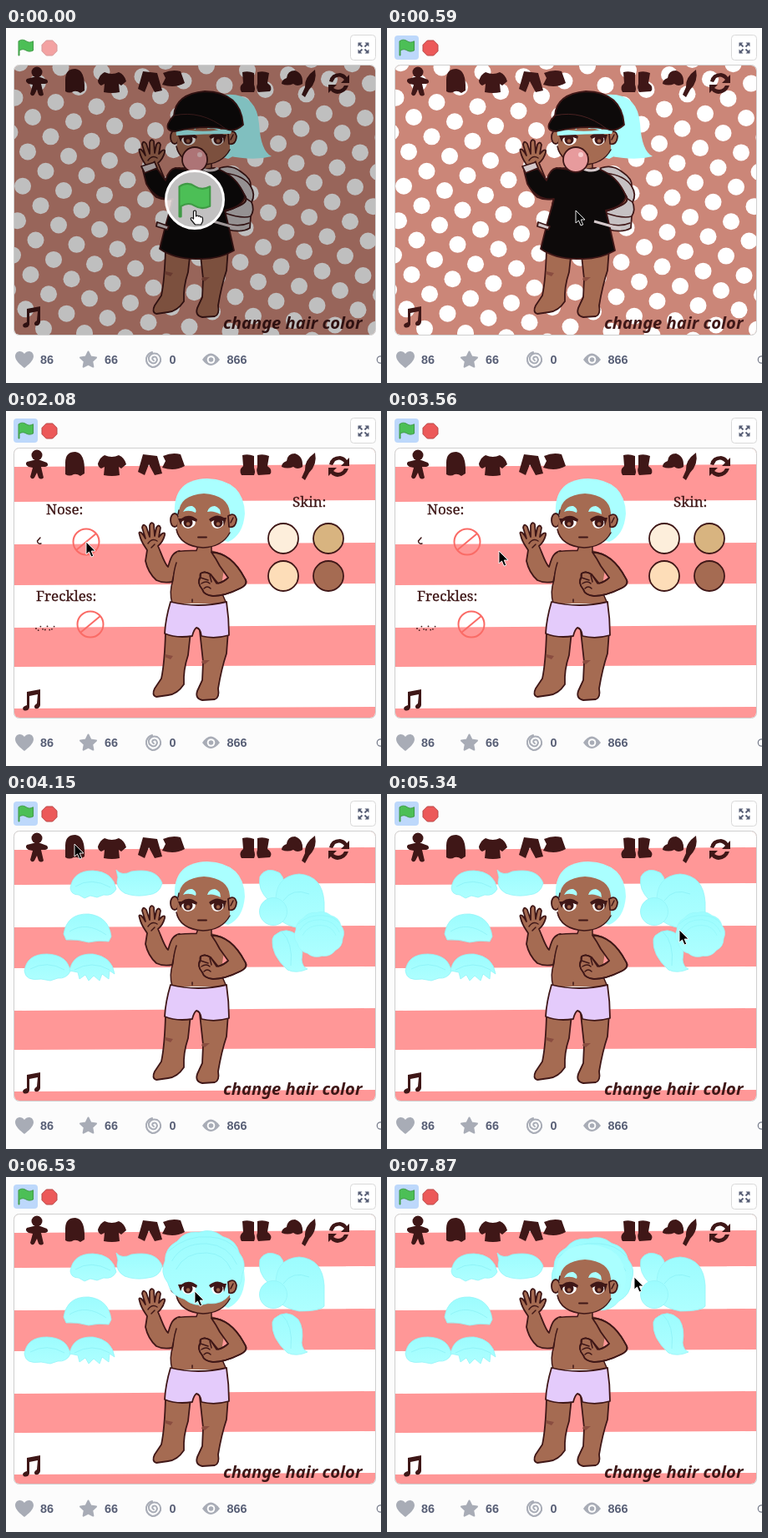
Animation, 449 px wide and 426 px high, one loop 8 s. Source, as an HTML page:

```html
<!DOCTYPE html>
<html lang="en">
<head>
<meta charset="utf-8">
<title>Dress-up player</title>
<style>
html, body { margin: 0; width: 100%; height: 100%; overflow: hidden; background: #fcfcfc; }
svg { display: block; width: 449px; height: 426px; }
.ink { fill: #3f1717; }
.line { stroke: #3f1717; stroke-width: 1.8; stroke-linejoin: round; stroke-linecap: round; }
.thin { fill: none; stroke: #3f1717; stroke-width: 1.5; stroke-linecap: round; }
.skin { fill: #a56b52; }
.black { fill: #0d0a0a; }
.hair { fill: url(#cyan); stroke: #93f4f8; stroke-width: .8; }
.cap { fill: #aaffff; }
.strand { fill: none; stroke: #84eef4; stroke-width: .9; opacity: .7; }
.label { font: 17px "Noto Serif", serif; fill: #3f1717; stroke: #3f1717; stroke-width: .3; }
.brush { font: italic bold 20.2px "Noto Sans", sans-serif; fill: #3f1717; }
.stat { font: bold 14.4px "Liberation Sans", Arial, sans-serif; fill: #575e75; }
.no { fill: none; stroke: #fa6b66; stroke-width: 2; }
.grey { fill: #a8acb6; }
</style>
</head>
<body>
<svg viewBox="0 0 449 426">
  <defs>
    <clipPath id="frame"><rect x="10" y="45" width="432" height="323" rx="6"/></clipPath>
    <linearGradient id="cyan" x1="0" y1="0" x2="0" y2="1">
      <stop offset="0" stop-color="#9cfcfe"/><stop offset="1" stop-color="#aeffff"/>
    </linearGradient>
    <g id="curly">
      <path id="blob" class="hair"/>
      <path class="strand" d="M-38 -8Q-26 -30 4 -29Q30 -27 40 -4M-33 2Q-22 -19 4 -18Q25 -17 33 2M-42 -20Q-20 -40 8 -37Q28 -36 40 -22"/>
    </g>
    <g id="no"><circle class="no" r="15.5"/><path class="no" d="M-12 10L12 -10"/></g>
    <path id="flag" d="M0 1.4C3 -.8 6 -.8 9 1.2S14.500 3 17.500 1.300V12.500C14.500 14 11.500 14 8.800 12.300S3.500 11 1 12.600V18.500H0Z" fill="#4cbf56" stroke="#3f9a45" stroke-linejoin="round"/>
  </defs>

  <rect width="449" height="426" fill="#fcfcfc"/>
  <rect id="active" x="9" y="9" width="29" height="29" rx="4" fill="#bdd8fb"/>
  <use href="#flag" transform="translate(15 14.500)"/>
  <path id="stop" d="M48.300 15H55.700L61 20.300V27.700L55.700 33H48.300L43 27.700V20.300Z" fill="#ec5959" stroke="#b84848"/>
  <rect x="412.500" y="8.500" width="30" height="30" rx="4" fill="#fff" stroke="#d9d9d9"/>
  <path d="M426.500 22.500L422.500 18.500M429.500 22.500L433.500 18.500M426.500 25.500L422.500 29.500M429.500 25.500L433.500 29.500" stroke="#575e75" stroke-width="1.800"/>
  <path d="M421.500 17.500h5l-5 5zM434.500 17.500h-5l5 5zM421.500 30.500h5l-5 -5zM434.500 30.500h-5l5 -5z" fill="#575e75"/>

  <g clip-path="url(#frame)">
    <g id="dots"><rect x="9" y="44" width="434" height="325" fill="#cb8678"/></g>
    <g id="stripes">
      <rect x="9" y="44" width="434" height="325" fill="#fff"/>
      <path fill="#ff9797" d="M9 67L443 64V107L9 109ZM9 160L443 158V207L9 209ZM9 260L443 257V305L9 307ZM9 357L443 355V370H9Z"/>
    </g>

    <g class="ink">
      <circle cx="37" cy="53" r="6.500"/>
      <path d="M33 59H41L49 62Q52 66 47 67L42 67L45 80Q42 83 39 80L37 74L34 80Q31 83 29 79L32 68L27 67Q22 64 25 61Z"/>
      <path d="M71 76V62Q71 49 83 49Q95 50 94 75L89 78Q85 75 81 76Q76 79 71 76Z"/>
      <path d="M118 53Q127 57 135 53Q142 56 144 64L138 69L135 67L136 77Q127 79 117 77L118 67L114 69Q110 67 110 63Q113 55 118 53Z"/>
      <path d="M164 52L181 54L187 75L178 77L171 64L166 77L158 73Z"/>
      <path d="M188 54Q199 49 209 52L214 66Q202 73 187 68L191 60Z"/>
      <path d="M283 53Q290 51 297 54L297 68Q299 73 297 77H282Q278 71 284 66ZM301 53Q308 51 315 54L313 66Q320 71 316 76L302 77Q299 72 301 67Z"/>
      <path d="M330 67Q330 62 336 60Q337 51 346 51Q356 54 355 67Q349 71 344 67Q337 70 330 67Z"/>
      <path d="M370 50Q373 64 363 74L358 83L354 80L358 71Q357 59 370 50Z"/>
      <path d="M387 64Q389 54 400 54Q406 55 408 59L411 56V66H401L405 62Q400 56 394 60L391 65ZM410 69Q407 78 397 79Q391 78 389 75L386 78V68H396L392 72Q398 76 403 72L405 69Z"/>
      <path d="M25 337L41 334V353Q40 358 35 357Q32 354 37 351L38 340L28 342V356Q26 361 21 359Q18 355 25 353Z"/>
    </g>

    <g id="skinTab">
      <text class="label" x="48" y="124">Nose:</text>
      <text class="label" x="36" y="228">Freckles:</text>
      <text class="label" x="343" y="115">Skin:</text>
      <path class="thin" d="M41 152L37.500 156Q38 160 42 159"/>
      <use href="#no" x="96" y="157"/><use href="#no" x="101" y="256"/>
      <g id="freckles" class="ink"></g>
      <g class="line">
        <circle cx="332" cy="153" r="18" fill="#fdeedb"/><circle cx="386" cy="153" r="18" fill="#d8b480"/>
        <circle cx="332" cy="198" r="18" fill="#fdddb8"/><circle cx="386" cy="198" r="18" fill="#a56b52"/>
      </g>
    </g>

    <text id="hairText" class="brush" x="260" y="361">change hair color</text>
    <g id="hairTab">
      <path class="hair" d="M77 113Q80 92 104 92Q128 93 132 114Q127 123 117 121L109 124L101 122L94 125L87 121Q78 121 77 113Z"/>
      <path class="hair" d="M132 91Q139 99 150 93Q180 88 187 107Q184 120 170 121Q155 124 142 119Q130 112 134 100Z"/>
      <path class="hair" d="M69 168Q73 143 99 144Q123 147 126 171L123 177Q111 175 99 178Q85 174 72 175Z"/>
      <path class="hair" d="M22 212Q25 192 49 192Q74 193 77 213Q72 222 62 221L53 224L42 222Q23 225 22 212Z"/>
      <path class="hair" d="M76 212Q80 191 104 192Q127 195 130 216L124 212L123 222L115 216L112 224L105 218L99 224L95 217L88 222L86 214Z"/>
      <path class="hair" d="M304 99Q312 86 328 95Q336 104 331 117Q325 131 314 127Q301 115 304 99Z"/>
      <path class="hair" d="M323 130Q322 98 351 96Q379 98 381 130V155Q377 161 351 161Q334 158 323 147Z"/>
      <circle class="hair" cx="320" cy="141" r="16.500"/>
      <path class="hair" d="M321 170Q336 157 350 171Q357 182 354 199Q355 208 361 210Q348 216 337 211Q317 193 319 174Z"/>
      <path class="strand" d="M83 111Q102 99 125 112M76 165Q96 152 120 169M29 210Q49 199 70 211M82 211Q103 199 124 211M330 165Q344 178 341 206M332 128Q343 112 363 120"/>
    </g>

    <use id="slot" href="#curly" transform="translate(375 168.500) scale(.61)"/>
    <use id="backHair" href="#curly" transform="translate(246 117)"/>

    <g id="backWear">
      <path class="cap" d="M260 80Q300 76 303 115Q305 148 318 154Q296 160 265 153L268 108Z"/>
      <path class="line" fill="#c6c1c3" d="M256 168Q270 163 282 173Q294 181 293 190Q299 200 294 209Q298 218 293 226L292 240Q278 249 250 236Z"/>
      <path class="thin" d="M262 174Q285 177 293 190M272 200Q286 202 294 209M262 222Q282 229 293 226M264 235Q280 239 291 234"/>
    </g>

    <path class="line skin" d="M191 265Q190 302 186 321L178 333Q174 341 180 343L194 341Q205 340 213 328Q212 311 218 293L221 265Z"/>
    <path class="line skin" d="M232 264L236 301L235 323L229 336Q226 345 235 347L250 346Q256 344 254 333Q258 309 264 291L266 264Z"/>
    <path d="M191 292L200 294L197 298L190 295ZM235 299L244 299L238 304L234 302Z" fill="#8a4d40"/>
    <path class="line skin" d="M208 168C198 170 197 178 194 187C190 184 186 171 182 162Q188 157 190 149Q191 145 187 147L183 151L185 140Q183 135 180 140L178 150L177 136Q174 132 172 137L172 151L168 139Q164 134 163 140L167 153Q165 149 162 146Q158 144 160 149C162 158 166 162 169 167L167 180Q170 194 180 203Q188 207 199 205Z"/>
    <path class="skin" d="M199 231Q195 217 200 203L205 169Q217 167 229 167V157H246V167Q258 170 263 178L257 215L264 231Z"/>
    <path class="thin" d="M199 231Q195 217 200 203Q201 191 204 182M206 168.500Q217 167 228 167.500L229.500 163M246 163V168M257 215L264 231M170 159Q175 152 181 156M174 164L178 160M223 226V229"/>
    <path class="line skin" d="M246 169.500C263 170 276 182 286 201Q291 208 280 213Q262 222 248 222Q237 221 235 214Q228 206 233 198L233 195Q239 192 245 196L254 207Q261 205 266 200L256 186Q252 178 246 169.500" stroke="none"/>
    <path class="thin" d="M246 169C263 170 276 182 286 201Q291 208 280 213Q262 222 248 222Q237 221 235 214Q228 206 233 200Q230 194 238 193L245 196L252 207Q261 205 266 200M233 200L242 203M234 207Q240 203 244 207M237 213Q241 209 245 213M244 197L246 205"/>
    <path class="line" fill="#e4cbfb" d="M197 229Q230 237 264 229Q267 249 267 269Q250 274 234 270Q233 261 228 260Q225 262 223 270Q204 273 190 267Q191 249 197 229Z"/>

    <path class="cap" d="M203 133Q195 82 241 81Q285 83 286 123Q284 149 266 157L242 150Z"/>
    <ellipse class="line skin" cx="202" cy="131" rx="5" ry="8"/>
    <path class="skin" d="M207 122Q208 101 237 99Q266 101 268 122L268 145Q259 163 236 164Q210 162 204 145Z"/>
    <path class="thin" d="M204 142Q208 162 236 164Q259 163 268 146M206 124L207 119"/>
    <path fill="#aaffff" d="M212 121Q216 113 223 114Q229 117 227 122Q219 118 212 121ZM241 121Q243 114 250 114Q257 116 257 124Q248 119 241 121Z"/>
    <path class="line" d="M230 151.500H240"/>

    <use id="drag" href="#curly"/>

    <path class="line skin" d="M266 126Q274 121 276 130Q275 141 267 139Z"/>
    <path class="thin" d="M269 134L272 128"/>
    <path fill="#fff" d="M210 133Q219 127 227 132Q227 140 218 141Q211 140 210 133ZM246 133Q253 127 261 132Q261 140 253 141Q246 140 246 133Z"/>
    <path class="ink" d="M206 129L210 129Q219 122 229 130L228 133Q218 128 211 132L209 137ZM243 130Q252 122 261 128L264 128L261 138L260 132Q253 128 245 133Z"/>
    <circle class="ink" cx="218" cy="134" r="5.500"/><circle class="ink" cx="254" cy="134" r="5.500"/>
    <circle cx="218" cy="135.500" r="2.200" fill="#9a6048"/><circle cx="254" cy="135.500" r="2.200" fill="#9a6048"/>

    <g id="wear">
      <path class="line black" d="M203 168Q228 172 250 168Q276 176 286 202Q284 214 262 219L267 240L273 267Q254 278 231 277Q203 278 184 265L191 237L200 205Q180 208 168 187L164 171L181 169L191 183Q195 169 203 168Z"/>
      <path class="line" fill="#d4c9cb" d="M162 166L178 161L181 168L166 174ZM181 233L195 238L193 242L180 238Z"/>
      <path fill="none" stroke="#d4c9cb" stroke-width="3" d="M232 168Q246 174 254 168M248 232L280 241"/>
      <path class="cap" d="M203 120Q238 128 272 119L269 127Q238 127 204 129Z"/>
      <path class="line black" d="M194 115Q196 110 201 105Q203 79 238 76Q281 77 284 116Q273 126 263 121Q235 116 203 124Q191 124 194 115Z"/>
      <path fill="none" stroke="#4a2222" d="M201 105Q234 98 263 121"/>
      <circle class="line" cx="226" cy="158" r="15" fill="#e79b9d"/>
      <circle cx="232" cy="152" r="3" fill="#f8cfd0"/>
    </g>

    <g id="veil">
      <rect x="9" y="44" width="434" height="325" fill="#000" fill-opacity=".25"/>
      <circle cx="226" cy="206" r="34.500" fill="#fff" fill-opacity=".75" stroke="#fff" stroke-width="3"/>
      <use href="#flag" transform="translate(207.500 187.500) scale(2.100)"/>
    </g>
  </g>
  <rect x="9.500" y="44.500" width="433" height="324" rx="6" fill="none" stroke="#cfcfcf"/>

  <path class="grey" d="M22 408C17 404 11 399 11 394C11 387 19 386 22 391C25 386 33 387 33 394C33 399 27 404 22 408Z"/>
  <path id="star" class="grey" stroke="#a8acb6" stroke-width="2" stroke-linejoin="round"/>
  <path d="M177 399Q174 397 176 395Q180 393 181 398Q180 403 175 402Q170 400 171 395Q174 389 181 391Q186 394 185 400Q182 407 175 407Q167 404 168 396Q170 390 175 389" fill="none" stroke="#a8acb6" stroke-width="2" stroke-linecap="round"/>
  <path class="grey" d="M235 398Q245 383 256 398Q245 412 235 398Z"/>
  <circle cx="245.500" cy="398" r="4.800" fill="#fcfcfc"/><circle class="grey" cx="245.500" cy="398" r="2.800"/>
  <text class="stat" x="41" y="403">86</text><text class="stat" x="118" y="403">66</text>
  <text class="stat" x="195.500" y="403">0</text><text class="stat" x="264.500" y="403">866</text>
  <circle cx="448.500" cy="398" r="4.200" fill="none" stroke="#777c8b" stroke-width="1.200"/>

  <path id="hand" d="M4 1Q6 -1 7 1V7Q9 5 10 7Q12 6 12.500 8Q15 7 15 10V13L13 17H6L1 11Q0 8 3 9L4 10Z" fill="#fff" stroke="#111" stroke-width="1.200" stroke-linejoin="round"/>
  <path id="arrow" d="M0 0V15L3.500 12L6 18L8.700 17L6.200 11H11Z" fill="#000" stroke="#fff" stroke-width=".9"/>
</svg>
<script>
const $ = id => document.getElementById(id);
const LOOP = 8000, STEPS = 54;

// step, x, y of the pointer tip
const path = [
  [0, 226, 219], [7, 226, 219], [8, 227, 194], [9, 227, 172], [10, 220, 170],
  [12, 140, 162], [14, 96, 157], [16, 96, 157], [18, 150, 264], [20, 243, 200],
  [22, 200, 121], [24, 134, 168], [27, 86, 66], [28, 82, 60], [31, 82, 60],
  [32, 72, 70], [36, 350, 163], [37, 348, 155], [39, 306, 117], [41, 240, 176],
  [42, 201, 150], [43, 210, 120], [44, 226, 137], [46, 226, 139], [48, 226, 139],
  [50, 245, 144], [52, 301, 114], [53, 296, 120], [54, 296, 120]
];

function pointer(n) {
  const i = path.findIndex((p, k) => n < path[k + 1][0]);
  const [a, x, y] = path[i], [b, u, v] = path[i + 1];
  const k = (n - a) / (b - a);
  return [x + (u - x) * k, y + (v - y) * k];
}

function polar(r, s, a) { return `${(r * Math.cos(a)).toFixed(1)} ${(s * Math.sin(a)).toFixed(1)}`; }

function build() {
  const lobes = 10, turn = 2 * Math.PI / lobes;
  let d = "M" + polar(47, 43, .2);
  for (let i = 0; i < lobes; i++)
    d += "Q" + polar(53, 49, .2 + (i + .5) * turn) + " " + polar(47, 43, .2 + (i + 1) * turn);
  $("blob").setAttribute("d", d + "Z");

  let s = "";
  for (let i = 0; i < 10; i++) {
    const r = i % 2 ? 5 : 10, a = i * Math.PI / 5 - Math.PI / 2;
    s += `${i ? "L" : "M"}${98.5 + r * Math.cos(a)} ${398.5 + r * Math.sin(a)}`;
  }
  $("star").setAttribute("d", s + "Z");

  // slightly turned grid with a dot in the middle of every cell
  let dots = "";
  for (let i = -2; i < 11; i++)
    for (let j = -4; j < 8; j++)
      for (const h of [0, .5]) {
        const x = 32 + (i + h) * 49 - (j + h) * 6, y = 107 + (i + h) * 5.3 + (j + h) * 41.4;
        dots += `<circle cx="${x}" cy="${y}" r="10" fill="#fff"/>`;
      }
  $("dots").insertAdjacentHTML("beforeend", dots);

  let f = "";
  for (let i = 0; i < 9; i++)
    f += `<circle cx="${36 + i * 2.7}" cy="${261 + 2.6 * Math.sin(i * 2.2)}" r=".9"/>`;
  $("freckles").innerHTML = f;
}

const show = (id, on) => $(id).setAttribute("visibility", on ? "visible" : "hidden");
const place = (id, x, y) => $(id).setAttribute("transform", `translate(${x} ${y})`);

function draw(t) {
  const n = Math.floor((t + 10) * STEPS / LOOP) % STEPS;
  const [x, y] = pointer(n);
  const idle = n < 4, dressed = n < 5, hairTab = n >= 28;

  show("active", !idle);
  $("stop").setAttribute("opacity", idle ? .55 : 1);
  show("veil", idle);
  show("wear", dressed);
  show("backWear", dressed);
  show("stripes", n >= 11);
  show("skinTab", !dressed && !hairTab);
  show("hairTab", hairTab);
  show("hairText", dressed || hairTab);
  show("slot", hairTab && n < 37);
  show("drag", n >= 37 && n < 46);
  show("backHair", n >= 46);
  place("drag", x + 10.5, y - 28);

  show("hand", idle);
  show("arrow", !idle);
  place("hand", 220.5, n ? 218 : 219);
  place("arrow", x, y);
}

function tick() {
  draw(performance.now() % LOOP);
  requestAnimationFrame(tick);
}

build();
tick();
</script>
</body>
</html>
```
